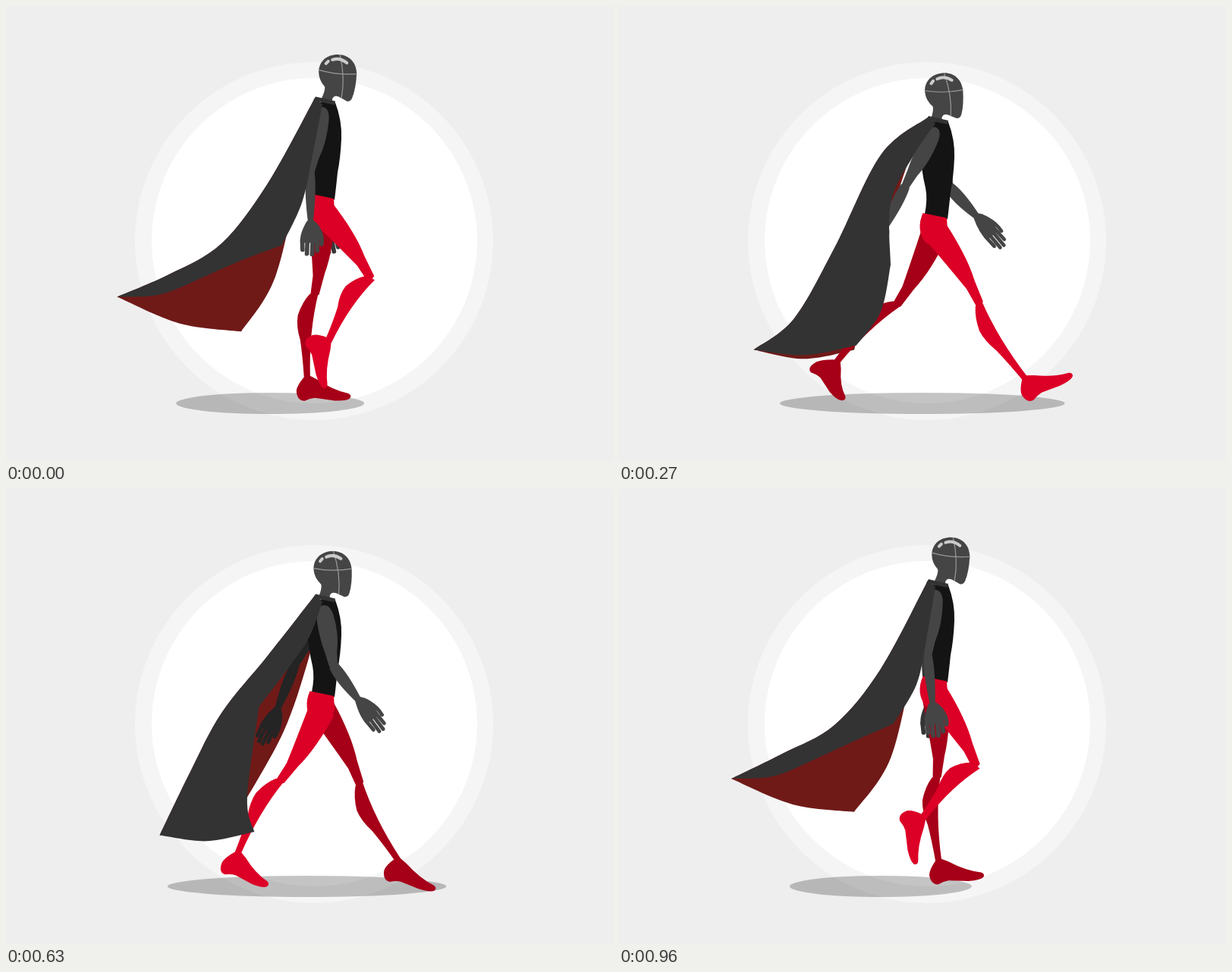
An HTML page with a canvas for the animation above (990 ms loop, 800 by 600 pixels).

```html
<!DOCTYPE html>
<html lang="en">
<head>
<meta charset="utf-8">
<title>Caped walk</title>
<style>
  html, body { margin: 0; height: 100%; overflow: hidden; background: #eee; }
  canvas { display: block; }
</style>
</head>
<body>
<canvas id="stage" width="800" height="600"></canvas>
<script>
const ctx = document.getElementById('stage').getContext('2d');
const LOOP = 990, HALF = LOOP / 2, STEP = 30;
const NEAR_RED = '#dc0026', FAR_RED = '#a60018', SKIN = '#454545', CAPE = '#333', LINING = '#701a18';

// Limb shapes lie along +x from joint to joint, with the front side at -y.
const shape = d => new Path2D(d);
const THIGH = shape('M0-18C30-19 60-17 82-11L111-6Q114 0 112 5L86 4Q50 9 0 17Q-20 0 0-18Z');
const SHIN = shape('M-2-5Q50 3 112-4L112 4Q85 8 63 13Q45 20 30 19Q12 15 0 6Z');
const FOOT = shape('M-3-4L-4 2Q-8 15-6 22Q0 34 9 30Q14 24 20 21L45 14Q60 8 62 3Q63-2 57-2Q38 2 12-3Z');
const UPPER = shape('M0-10Q30-13 55-7L75-5Q80 0 75 5L55 7Q30 11 0 10Q-16 8-16 0Q-16-8 0-10Z');
const FORE = shape('M0-6Q20-9 58-4L58 4Q20 10 0 6Q-5 0 0-6Z');
const PALM = shape('M-1-4Q8-12 16-12L32-9L32 12Q20 14-1 4Z');
const FINGERS = shape('M28 10L43 10M28 4L49 5M28-2L50-1M28-7L45-7M12-9Q24-14 35-12');
const TORSO = shape('M412 127L434 128Q443 152 442 175Q441 200 437 220Q435 240 433 256L403 249Q407 230 404 215Q398 190 397 165Q404 140 412 127Z');
const PELVIS = shape('M400.5 248L432 254.5L433 272Q425 298 404 287Q391 270 400.5 248Z');
const COLLAR = shape('M408 120L434 126L433 131L405 125Z');
const HEAD = shape('M415 124Q421 112 420 107Q412 98 412 88C412 73 423 64.5 437 64.5C452 64.5 462 75 462 90Q461 110 456 122Q454 127 449 126L442 122Q433 116 430 123L430 128Z');
const SEAMS = shape('M412 85Q437 92 462 90M440 65Q447 95 442 122');
const SHINE = shape('M421.5 76.5L424.5 73.5M430 71.5Q440 68 449 75.5');

// Periodic swing, and a bump of adjustable sharpness, both 1 at the peak time
const wave = (t, peak, period = LOOP) => Math.cos((t - peak) / period * 2 * Math.PI);
const pulse = (t, peak, sharp, period) => Math.exp(sharp * (wave(t, peak, period) - 1));

function fill(color, path) {
  ctx.fillStyle = color;
  ctx.fill(path);
}

function stroke(color, width, path) {
  ctx.strokeStyle = color;
  ctx.lineWidth = width;
  ctx.stroke(path);
}

function ellipse(color, x, y, rx, ry = rx) {
  ctx.fillStyle = color;
  ctx.beginPath();
  ctx.ellipse(x, y, rx, ry, 0, 0, 7);
  ctx.fill();
}

// A shape between two joints, fatter when shortened
function bone([ax, ay], [bx, by], length, color, path, lines) {
  const stretch = Math.hypot(bx - ax, by - ay) / length;
  ctx.save();
  ctx.translate(ax, ay);
  ctx.rotate(Math.atan2(by - ay, bx - ax));
  ctx.scale(stretch, 1 / stretch);
  fill(color, path);
  if (lines) stroke(color, 5, lines);
  ctx.restore();
}

// The ankle swings and lifts; the knee bends forward to suit.
function leg(t, drop, color) {
  const hip = [416, 272 + drop];
  const ankle = [
    411 + 128 * wave(t, 230),
    491 - 56 * pulse(t, 957, 6.5) - 22 * pulse(t, 740, 3)
  ];
  const dx = ankle[0] - hip[0], dy = ankle[1] - hip[1], reach = Math.hypot(dx, dy);
  const thigh = 109, shin = 110 - 50 * (1 - reach / 220);
  const along = (reach ** 2 + thigh ** 2 - shin ** 2) / (2 * reach);
  const bend = Math.sqrt(Math.max(0, thigh ** 2 - along ** 2));
  const knee = [
    hip[0] + (dx * along + dy * bend) / reach,
    hip[1] + (dy * along - dx * bend) / reach
  ];
  const pitch = (50 + 52 * wave(t, 925) - 38 * pulse(t, 205, 3) + 22 * pulse(t, 515, 2.5)) * Math.PI / 180;
  const sole = 63 - 12 * pulse(t, 740, 4);
  const toe = [ankle[0] + sole * Math.cos(pitch), ankle[1] + sole * Math.sin(pitch)];

  bone(hip, knee, 111, color, THIGH);
  bone(knee, ankle, 112, color, SHIN);
  bone(ankle, toe, 62, color, FOOT);
}

function arm(t, drop, color) {
  const swing = wave(t, 718);
  const shoulder = [416 + 5 * swing, 149 + drop];
  const elbow = [406 + 30 * swing, 219 + .75 * drop];
  const wrist = [411 + 62 * swing, 283 - 7 * swing];
  const tip = [417 + 95 * swing, 328 - 11 * swing];

  bone(shoulder, elbow, 75, color, UPPER);
  bone(elbow, wrist, 58, color, FORE);
  bone(wrist, tip, 52, color, PALM, FINGERS);
}

// Closed outline from smooth curves that meet at sharp corners
function outline(color, ...curves) {
  const path = new Path2D();
  path.moveTo(...curves[0][0]);
  for (const p of curves) {
    for (let i = 0; i < p.length - 1; i++) {
      const a = p[i], b = p[i + 1], before = p[i - 1] || a, after = p[i + 2] || b;
      path.bezierCurveTo(
        a[0] + (b[0] - before[0]) / 6, a[1] + (b[1] - before[1]) / 6,
        b[0] - (after[0] - a[0]) / 6, b[1] - (after[1] - a[1]) / 6, ...b);
    }
  }
  fill(color, path);
}

const between = (a, b, sag) => [(a[0] + b[0]) / 2, (a[1] + b[1]) / 2 + sag];

// Each point of the cloth sways with its own lag.
function cape(t, drop) {
  const flare = pulse(t, 965, 1.5), billow = pulse(t, 462, 2.3), drag = pulse(t, 190, 2.5);
  const swing = wave(t, 720);
  const neck = [417, 130 + drop];
  const chest = [398 + 10 * wave(t, 850), 195];
  const waist = [374 + 21 * wave(t, 880), 249 + 15 * wave(t, 130)];
  const fold = [350 + 17 * wave(t, 100), 312 + 30 * wave(t, 230)];
  const edge = [323 + 25 * wave(t, 350), 415 - 80 * flare];
  const corner = [303 + 42 * wave(t, 480), 463 - 108 * flare];
  const tail = [178 + 32 * wave(t, 520), 465 - 83 * flare];
  const back = [284, 308 - 42 * billow + 28 * drag];
  const blade = [345, 217 + 25 * wave(t, 860)];
  const inner = [391 + 8 * swing, 215 + 15 * swing];
  const side = [353 + 18 * wave(t, 760), 350 - 95 * billow + 40 * drag];
  const farCorner = [310, 420 + 46 * drag];
  const spine = [tail, between(tail, back, 8 + 18 * wave(t, 270)), back, blade, [407, 122 + drop]];

  return {
    drawLining() {
      outline(LINING, [neck, inner, side, farCorner], [farCorner, between(farCorner, tail, 12), tail], spine);
    },
    drawOutside() {
      outline(CAPE, [neck, chest, waist, fold], [fold, edge, corner], [corner, between(corner, tail, 10), tail], spine);
    }
  };
}

function drawHead(drop) {
  ctx.save();
  ctx.translate(424 - .17 * drop, 125 + drop);
  ctx.rotate(-drop * .0048);
  ctx.translate(-424, -125);
  fill(SKIN, HEAD);
  stroke('#999', 1.2, SEAMS);
  stroke('#ccc', 4, SHINE);
  ctx.restore();
}

function lowered(drop, color, path) {
  ctx.save();
  ctx.translate(0, drop);
  fill(color, path);
  ctx.restore();
}

function draw(t) {
  const drop = 13 - 14 * wave(t, 475, HALF);
  const gather = pulse(t, 472, 1.5, HALF);
  const left = 211 + 14 * gather, right = 596 - 132 * gather;
  const shade = Math.round(52 + 18 * wave(t, 210));
  const cloth = cape(t, drop);

  ctx.fillStyle = '#eee';
  ctx.fillRect(0, 0, 800, 600);
  ellipse('#f5f5f5', 406, 310, 236);
  ellipse('#fff', 406.5, 309.5, 214.5);
  ellipse('rgba(0,0,0,.23)', (left + right) / 2, 524, (right - left) / 2, 14);

  cloth.drawLining();
  arm(t + HALF, drop, `rgb(${shade},${shade},${shade})`);
  leg(t + HALF, drop, FAR_RED);
  lowered(drop, '#141414', TORSO);
  lowered(drop, NEAR_RED, PELVIS);
  leg(t, drop, NEAR_RED);
  arm(t, drop, SKIN);
  cloth.drawOutside();
  drawHead(drop);
  lowered(drop, CAPE, COLLAR);
}

ctx.lineCap = 'round';
const start = performance.now();
function tick() {
  draw(Math.floor((performance.now() - start) % LOOP / STEP) * STEP);
  requestAnimationFrame(tick);
}
tick();
</script>
</body>
</html>
```
